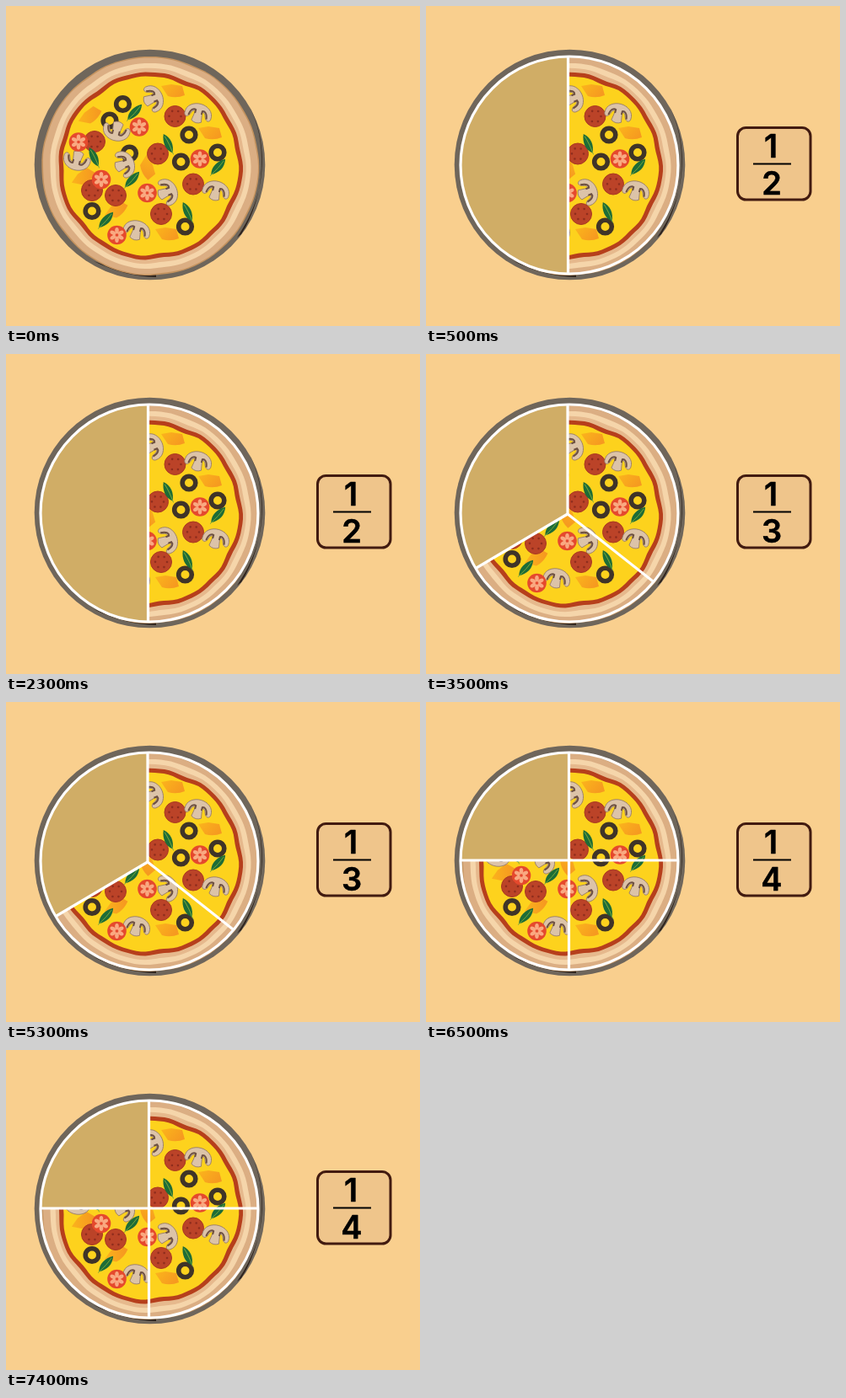
Animation, 491 px wide and 380 px high, one loop 8 s. Source, as an HTML page:

```html
<!DOCTYPE html>
<html lang="en">
<head>
<meta charset="utf-8">
<title>Pizza fractions</title>
<style>
  html, body { margin: 0; width: 100%; height: 100%; overflow: hidden; background: #f9cf8e; }
  svg { display: block; width: 100%; height: 100%; }
  text { font: 600 38px Inter, Arial, sans-serif; text-anchor: middle; stroke: #000; stroke-width: .5; stroke-linejoin: round; }
</style>
</head>
<body>
<svg viewBox="0 0 491 380">
  <defs>
    <clipPath id="disc"><circle cx="170" cy="189" r="129"/></clipPath>
    <linearGradient id="orange" x2="1" y2=".5">
      <stop stop-color="#fbb51c"/><stop offset="1" stop-color="#f69a20"/>
    </linearGradient>
    <path id="pepper" fill="url(#orange)" d="M-14-6L-2-8 11-6 14 5Q4 9-6 6Z"/>
    <circle id="olive" r="7.8" fill="none" stroke="#3f3428" stroke-width="5.6"/>
    <g id="salami">
      <circle r="12.5" fill="#bb4328" stroke="#a83720"/>
      <circle r="7" fill="none" stroke="#8f2d1d" stroke-width="2.6" stroke-linecap="round" stroke-dasharray="0 7.33"/>
    </g>
    <g id="mushroom">
      <path fill="#dcc3a8" stroke="#94796a" stroke-width=".8" d="M-16 3C-17-7-8-12 0-12S17-7 16 3C15 7 11 7 9 2 8-2 6-3 4-3L6 9Q0 13-6 9L-4-3C-6-3-8-2-9 2-11 7-15 7-16 3Z"/>
      <path fill="none" stroke="#6d5041" stroke-width="2" d="M-11 4C-10-4-6-5-4-4V0M11 4C10-4 6-5 4-4V0"/>
    </g>
    <g id="leaf">
      <path fill="#1d6c37" d="M1-13C7-5 6 4 0 12-6 5-5-5 1-13"/>
      <path fill="none" stroke="#7aa83a" stroke-width=".9" d="M1-10Q2 0 0 14"/>
    </g>
    <g id="tomato">
      <circle r="11.3" fill="#e5492d"/>
      <g id="seeds" fill="#f9a981"></g>
    </g>
  </defs>

  <circle cx="170.5" cy="188.5" r="136.8" fill="#6f665b"/>
  <path fill="#2d221b" d="M288 118C305 148 318 213 274 275L279 271C309 225 310 158 288 118M104 303Q140 321 178 322V319Q140 317 104 303"/>
  <g id="pizza"></g>

  <g id="slices">
    <g clip-path="url(#disc)">
      <path id="cover" fill="#d0ad66"/>
      <path id="cuts" fill="none" stroke="#fff" stroke-width="3.2"/>
    </g>
    <circle cx="170" cy="189" r="129" fill="none" stroke="#fff" stroke-width="3.2"/>
    <rect x="369.5" y="144.5" width="86.5" height="85.5" rx="10" fill="#efc58b" stroke="#421b10" stroke-width="3"/>
    <path d="M388 187.5H433" stroke="#000" stroke-width="2"/>
    <text x="409" y="180">1</text>
    <text id="denominator" x="410" y="223.5"></text>
  </g>
</svg>
<script>
const $ = id => document.getElementById(id);

// Closed ellipse with a gently uneven edge.
function blob(rx, ry, wobble, fill) {
  const points = Array.from({ length: 120 }, (_, i) => {
    const a = i * Math.PI / 60;
    const k = 1 + wobble * (Math.sin(7 * a + 1) + Math.sin(12 * a) * .7 + Math.sin(19 * a + 2) * .5);
    return [171 + rx * k * Math.cos(a), 190 + ry * k * Math.sin(a)].map(v => v.toFixed(1));
  });
  return `<polygon points="${points.join(" ")}" fill="${fill}"/>`;
}

const scatter = (shape, turn, ...spots) => spots.map(spot =>
  `<use href="#${shape}" transform="translate(${spot}) rotate(${turn})"/>`).join("");

$("seeds").innerHTML = Array.from({ length: 6 }, (_, i) =>
  `<ellipse cy="-5.3" rx="2.3" ry="3.7" transform="rotate(${i * 60})"/>`).join("");

$("pizza").innerHTML =
  blob(129, 130, .002, "#c4935f") +
  blob(127.5, 128.5, .003, "#dbae83") +
  blob(119, 122, .003, "#f5d5aa") +
  blob(113, 116, .005, "#e6b98d") +
  blob(109, 111, .007, "#b63f1c") +
  blob(104, 106, .009, "#fdd21d") +
  scatter("pepper", 0, [198, 101], [242, 151], [191, 271]) +
  scatter("pepper", 65, [167, 192]) +
  scatter("pepper", -45, [100, 131], [92, 204], [131, 243]) +
  scatter("olive", 0, [138.5, 116.5], [123, 136], [217, 153], [146.5, 175], [207.5, 185], [251, 174], [102, 243.5], [212.5, 262]) +
  scatter("salami", 0, [200.5, 131], [105, 161], [180, 175.5], [102, 219], [130, 225], [222, 211.5], [184, 247]) +
  scatter("mushroom", 15, [228, 128], [249, 220], [155, 267]) +
  scatter("mushroom", 68, [174, 110], [140, 188], [191, 221]) +
  scatter("mushroom", 195, [131, 148], [84, 183]) +
  scatter("leaf", 40, [152, 126], [251, 191], [149, 206], [118, 254]) +
  scatter("leaf", -28, [104, 180], [192, 164], [215, 245]) +
  scatter("tomato", 0, [158, 143.5], [86, 161.5], [113, 206], [167.5, 222], [230, 181.5], [131.5, 272]);

const steps = [
  { start: 500, parts: 2, cover: "M168.5 0H0V380H168.5Z", cuts: "M168.5 0V380" },
  { start: 3500, parts: 3, cover: "M168 0V190L0 289.5V0Z", cuts: "M168 0V190L0 289.5M168 190L318 308.5" },
  { start: 6500, parts: 4, cover: "M0 0H169.5V188H0Z", cuts: "M169.5 0V380M0 188H340" }
];
let shown;

function draw() {
  const time = performance.now() % 8000;
  const step = steps.findLast(s => time >= s.start) || null;
  if (step !== shown) {
    shown = step;
    $("slices").style.display = step ? "" : "none";
    if (step) {
      $("cover").setAttribute("d", step.cover);
      $("cuts").setAttribute("d", step.cuts);
      $("denominator").textContent = step.parts;
    }
  }
  requestAnimationFrame(draw);
}
draw();
</script>
</body>
</html>
```
